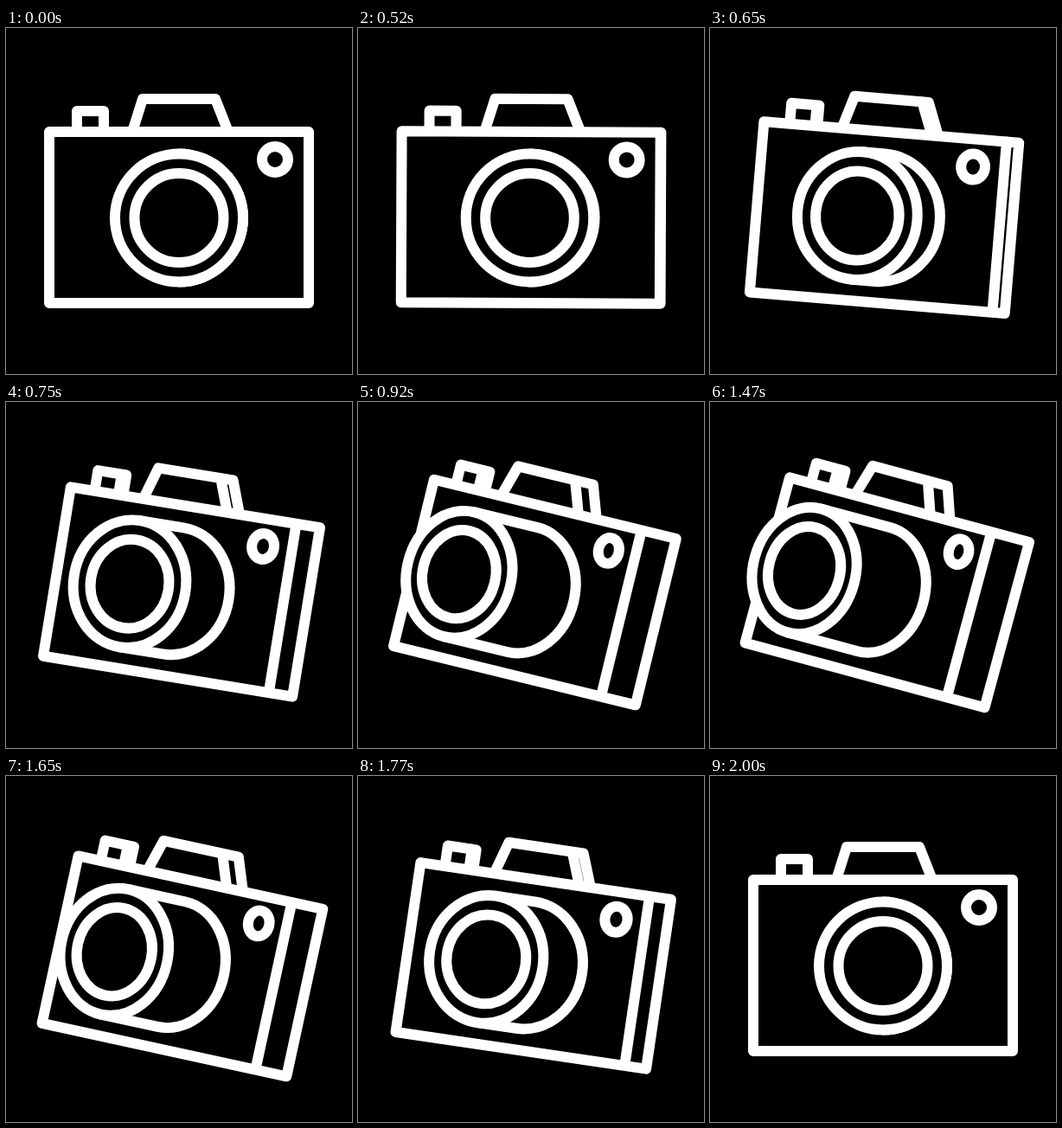
Recreate the animation shown at these times as an HTML page. Size 400 by 400 pixels, loop 2.02 s.

```html
<!DOCTYPE html>
<html lang="en">
<head>
<meta charset="utf-8">
<title>Camera</title>
<style>
  html, body { margin: 0; width: 100%; height: 100%; overflow: hidden; background: #000; }
  svg { display: block; width: 100vw; height: 100vh; }
  #camera { fill: #000; stroke: #fff; stroke-width: 12; stroke-linejoin: round; stroke-linecap: round; }
  #flash { fill: #fff; stroke: none; }
</style>
</head>
<body>
<svg viewBox="0 0 400 400">
  <g id="camera">
    <path id="button"/>
    <path id="prism"/>
    <path id="body"/>
    <ellipse id="ring"/>
    <path id="barrel"/>
    <ellipse id="rim"/>
    <ellipse id="glass"/>
    <ellipse id="flash"/>
  </g>
</svg>
<script>
const LOOP = 2020, START = 500, HALF = 750, TILT = 16;
const el = id => document.getElementById(id);
const mix = (a, b, p) => a + (b - a) * p;

// cubic-bezier(.25, .1, .25, 1)
function ease(x) {
  if (x <= 0) return 0;
  if (x >= 1) return 1;
  let lo = 0, hi = 1, s = 0.5;
  for (let i = 0; i < 24; i++) {
    s = (lo + hi) / 2;
    if (0.75 * s * (1 - s) + s ** 3 < x) lo = s; else hi = s;
  }
  return 0.3 * s * (1 - s) ** 2 + 3 * s * s * (1 - s) + s ** 3;
}

function ellipse(id, cx, cy, rx, ry) {
  const attrs = { cx, cy, rx, ry };
  for (const name in attrs) el(id).setAttribute(name, attrs[name]);
}

const path = (id, d) => el(id).setAttribute('d', d);

// Coordinates are relative to the stage centre of rotation.
function draw(time) {
  const t = time % LOOP;
  const p = ease(1 - Math.abs(t - START - HALF) / HALF);
  const at = (rest, turned) => mix(rest, turned, p);
  const squash = at(1, 0.79);

  el('camera').setAttribute('transform', `translate(200 220) rotate(${TILT * p})`);

  const edge = at(150, 100);
  path('body', `M${at(-150, -138)} -100H${at(150, 148)}V98H${at(-150, -138)}Z M${edge} -100V98`);

  path('button', `M${at(-118, -113)} -100V-124H${at(-87, -78)}V-100 M${at(-87, -87.5)} -124V-100`);

  path('prism', `M${at(-54, -61)} -100L${at(-42, -50)} -138H${at(42, 40)}L${at(57, 53)} -100
    M${at(42, 15)} -138L${at(57, 28)} -100`);

  ellipse('ring', at(111, 70), -68, 15 * at(1, 0.76), 15);

  const front = at(0, -100), back = at(0, -12), rx = 74 * squash;
  path('barrel', `M${front} -74.5H${back}A${rx} 74 0 0 1 ${back} 73.5H${front}`);
  ellipse('rim', front, -0.5, rx, 74);
  ellipse('glass', front, -0.5, 51.5 * squash, 51.5);

  const pulse = Math.max(0, Math.sin(Math.PI * (t - 1050) / 400));
  const k = t > 1050 && t < 1450 ? 1.11 * Math.sqrt(pulse) : 0;
  ellipse('flash', 70 - 18 * k, -68 + 4 * k, 54.5 * k, 58 * k);
}

function tick() {
  draw(performance.now());
  requestAnimationFrame(tick);
}
tick();
</script>
</body>
</html>
```
